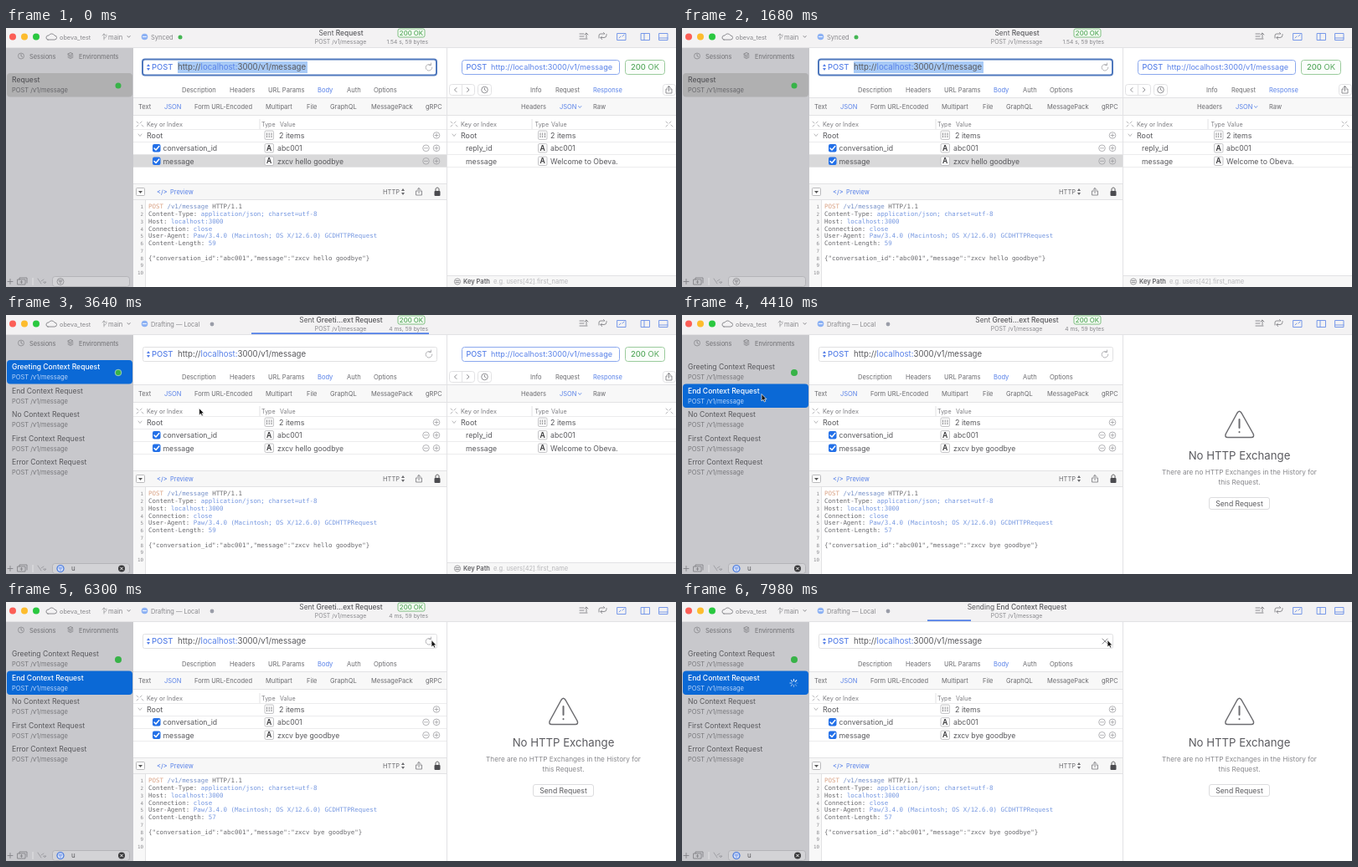
Write an HTML page that moves like this. It is 800 by 310 pixels and loops after 8000 ms.

```html
<!DOCTYPE html>
<html lang="en">
<head>
<meta charset="utf-8">
<title>API client</title>
<style>
  html, body { margin: 0; width: 100%; height: 100%; overflow: hidden; background: #fff; }
  svg { display: block; width: 800px; height: 310px; }
  text { font-family: Inter, Roboto, sans-serif; fill: #58585c; white-space: pre; }
  .code { font-family: "DejaVu Sans Mono", monospace; font-size: 7.45px; fill: #69696d; }
  .icon { fill: none; stroke: #838387; stroke-width: .9; stroke-linecap: round; stroke-linejoin: round; }
  .blue { stroke: #6a8fe8; }
  .rule { stroke: #e2e2e4; stroke-width: 1; }
  .faint { opacity: .65; }
</style>
</head>
<body>
<svg id="stage" viewBox="0 0 800 310"></svg>
<script>
const LOOP = 8000;
const DRAFT = 2100, ACTIVATE = 3000, SENT = 3200, PICK_END = 4200, SEND_END = 6700;
const BLUE = '#5881e8', DARK = '#58585c', GREY = '#88888c', GREEN = '#55a85c', SELECTED = '#0b69d6';

const text = (x, y, size, value, fill = DARK, extra = '') =>
  `<text x="${x}" y="${y}" font-size="${size}" style="fill:${fill}" ${extra}>${value}</text>`;
const middle = 'text-anchor="middle"';
const rect = (x, y, w, h, fill, r = 0, stroke = 'none', width = 1) =>
  `<rect x="${x}" y="${y}" width="${w}" height="${h}" rx="${r}" fill="${fill}" stroke="${stroke}" stroke-width="${width}"/>`;
const dot = (x, y, r, fill, extra = '') => `<circle cx="${x}" cy="${y}" r="${r}" fill="${fill}" ${extra}/>`;
const icon = (d, cls = '', extra = '') => `<path class="icon ${cls}" d="${d}" ${extra}/>`;
const ring = (x, y, r, color = '#a0a0a4') => dot(x, y, r, 'none', `stroke="${color}" stroke-width=".8"`);
const rule = (x1, y1, x2, y2, cls = '') => `<path class="rule ${cls}" d="M${x1} ${y1}L${x2} ${y2}"/>`;
const during = (from, to, ...parts) => `<g data-from="${from}" data-to="${to}">${parts.join('')}</g>`;
const tint = (fill, value) => `<tspan style="fill:${fill}">${value}</tspan>`;
const bold = value => `<tspan font-weight="550">${value}</tspan>`;
const labels = (y, size, items, active) =>
  items.map(([x, name]) => text(x, y, size, name, name === active ? BLUE : '#6a6a6e')).join('');
const addButton = (x, y) => ring(x, y, 3.8) + icon(`M${x - 2} ${y}h4M${x} ${y - 2}v4`, 'faint');
const removeButton = (x, y) => ring(x, y, 3.8) + icon(`M${x - 2} ${y}h4`, 'faint');
const share = (x, y) => icon(`M${x - 1.5} ${y - 1}h-2v5h7v-5h-2M${x} ${y + 1.5}v-6l-2 2m2-2l2 2`);
const upDown = (x, y, color) =>
  `<path d="M${x - 2} ${y - 1}l2-3 2 3zM${x - 2} ${y + 1}l2 3 2-3z" fill="${color}"/>`;
const expand = (x, y) => icon(`M${x - 3} ${y - 3}l2 2m4 2l2 2M${x + 3} ${y - 3}l-2 2m-2 2l-2 2`, 'faint');
const rowRules = (x1, x2) => [121.5, 136.5, 151.5, 166.5].map(y => rule(x1, y, x2, y, 'faint')).join('');

function toolbar() {
  const header = (title, stats) =>
    text(400, 9, 8.4, title, DARK, middle) + text(399.5, 18.5, 6.9, 'POST /v1/message', GREY, middle) +
    (stats ? rect(468, 1, 32, 10, '#f4fbf3', 2, '#80bf82') + text(484, 9, 7.8, '200 OK', GREEN, middle + ' font-weight="500"') +
      text(504, 18.5, 6.7, stats, GREY, 'text-anchor="end"') : '');
  const sending = name => header('Sending ' + bold(name));
  return rect(0, 0, 800, 23, '#f3f2f3') +
    [['#fc5f57', 8], ['#fdbc2e', 22], ['#2ac840', 36]].map(([c, x]) => dot(x, 10.5, 4, c)).join('') +
    icon('M50 14h8a2.5 2.5 0 0 0 0-5a4 4 0 0 0-7 0a2.5 2.5 0 0 0-1 5z') + text(64, 13.5, 7.3, 'obeva_test', GREY) +
    icon('M117 7v7M117 12c3 0 3-2 3-4M115 9l2-2 2 2', 'faint') +
    text(122, 13.5, 7.6, 'main', GREY) + icon('M145 9.5l1.6 1.8 1.6-1.8') +
    dot(165.5, 10.5, 3.8, '#8db2f4') + icon('M163.5 10.5h4', '', 'style="stroke:#fff"') +
    during(0, DRAFT, text(173, 13.5, 7.5, 'Synced', GREY), dot(208, 11, 2.5, '#44b653')) +
    during(DRAFT, LOOP, text(173, 13.5, 7.4, 'Drafting — Local', GREY), dot(246, 11, 2.4, '#9a9da8')) +
    during(0, ACTIVATE, header('Sent ' + bold('Request'), '1.54 s, 59 bytes')) +
    during(ACTIVATE, SENT, sending('Greeting Context Request')) +
    during(SENT, SEND_END, header('Sent ' + bold('Greeti...ext Request'), '4 ms, 59 bytes')) +
    during(SEND_END, LOOP, sending('End Context Request')) +
    icon('M685 7h5M685 10h5M685 13h9M693 12V6l-2 2m2-2l2 2') +
    icon('M708 12V9q0-2 2-2h5l-1.5-1.5M717 7.5v1q0 3-3 3h-4l1.5-1.5M710 11.5l1.5 2') +
    icon('M730 6.5h10v8h-10zM732 12l2-2m2 0l2-2', 'blue') +
    icon('M758.5 6.5h10v8h-10zM762 6.5v8', 'blue') + icon('M780 6.5h10v8h-10zM780 12h10', 'blue') +
    during(DRAFT, ACTIVATE, rect(0, 0, 800, 23, '#e4e4e4', 0).replace('/>', ' opacity=".5"/>'),
      [8, 22, 36].map(x => dot(x, 10.5, 4.2, '#d0d0d1')).join('')) +
    rule(0, 23.5, 800, 23.5) +
    `<rect id="progress" x="293" y="21.2" height="1.8" fill="#5683e8"/>`;
}

function sidebar() {
  const top = i => 54 + 28.5 * i;
  const row = (name, i, color = DARK, sub = '#77777b', weight = 400) =>
    text(7, top(i) + 11.3, 8.55, name, color, `font-weight="${weight}"`) + text(7, top(i) + 23, 7.5, 'POST /v1/message', sub);
  const pick = (i, fill) => rect(1, top(i), 150, 28.5, fill, 4);
  const names = ['Greeting', 'End', 'No', 'First', 'Error'].map(n => n + ' Context Request');
  const list = selected => names.map((n, i) => i === selected ? row(n, i, '#fff', '#bcd6fa', 500) : row(n, i)).join('');
  const status = r => dot(134, 69, r, '#38b348');
  const spokes = Array.from({ length: 8 }, (_, i) =>
    `<path d="M0-2V-5" stroke="#fff" stroke-width="1.1" opacity="${.25 + i * .1}" transform="rotate(${i * 45})"/>`).join('');
  const filterBars = 'M62.8 302h4.4M63.6 303.7h2.8M64.5 305.3h1';
  return rect(0, 24, 152, 286, '#c8c8cc') +
    during(DRAFT, ACTIVATE, rect(0, 24, 152, 286, '#dedede')) +
    ring(18, 33.5, 3.5, GREY) + icon('M18 31.5v2l1.5 1') + text(28, 36.5, 7.4, 'Sessions', '#707074') +
    icon('M74 31l3-1.5 3 1.5-3 1.5zM74 33l3 1.5 3-1.5M74 35l3 1.5 3-1.5') + text(87, 36.5, 7.4, 'Environments', '#707074') +
    during(0, DRAFT, pick(0, '#b0b0b1'), row('Request', 0, DARK, '#66666a', 500), status(3.5)) +
    during(DRAFT, ACTIVATE, pick(0, '#c0c0c0'), list(-1), status(3.3)) +
    during(ACTIVATE, PICK_END, pick(0, SELECTED), list(0), dot(134, 69, 3.8, '#38b348', 'stroke="#a9d3c4" stroke-width=".9"')) +
    during(PICK_END, LOOP, pick(1, SELECTED), list(1), status(4)) +
    during(SEND_END, LOOP, `<g transform="translate(133.5 97)"><g id="spinner">${spokes}</g></g>`) +
    icon('M2 303.5h6M5 300.5v6') + icon('M14 301h9v6h-9zM16 301v-2h9v6M18.5 302.5v3M17 304h3') +
    rule(32, 299, 32, 308) + icon('M38 300l4 6M42 303l3-2M45 304h3l-1.5 1.5z', 'faint') +
    rect(55.5, 297.5, 92, 12, 'rgba(255,255,255,.2)', 3, '#b4b4b8') +
    during(0, DRAFT, ring(65, 303.5, 4, GREY), icon(filterBars)) +
    during(DRAFT, LOOP, dot(65, 303.5, 4, '#d6e2f8', 'stroke="#3f73dc" stroke-width="1.2"'),
      icon(filterBars, 'blue'), text(78, 306.3, 8, 'u'),
      dot(138, 303.5, 4, '#39393b'), icon('M136.5 302l3 3m0-3l-3 3', '', 'style="stroke:#fff"'));
}

function typeBox(x, y, letter) {
  return rect(x, y, 10.5, 10.5, '#fafafa', 1.5, '#b8b8bc', .8) + (letter
    ? text(x + 5.25, y + 8.4, 8.6, 'A', '#38383b', middle + ' font-weight="600"')
    : icon(`M${x + 2.5} ${y + 3}v5M${x + 5.2} ${y + 3}v5M${x + 8} ${y + 3}v5`, '', 'stroke-dasharray="1.7 1.3"'));
}

function tree(left, typeX, valueX) {
  return expand(left, 115) + text(left + 9, 118, 7.3, 'Key or Index', '#7c7c80') +
    text(typeX - 4, 118, 7.1, 'Type', '#7c7c80') + text(valueX + 1, 118, 7.1, 'Value', '#7c7c80') +
    icon(`M${left - 1} 127l2 2.5 2-2.5`, 'faint') + text(left + 9, 132, 8.9, 'Root') +
    typeBox(typeX, 123) + text(valueX, 132, 8.9, '2 items') + typeBox(typeX, 138.5, true) + typeBox(typeX, 154, true);
}

const url = (x, y, size, color = DARK) =>
  text(x, y, size, `http://${tint(BLUE, 'localhost')}${color === BLUE ? ':3000' : tint(BLUE, ':') + '3000'}/v1/message`, color);

function bodyPanel() {
  const check = (y, color, width) => icon(`M177 ${y + 5}l2 2 3.8-4.5`, '', `style="stroke:${color};stroke-width:${width}"`);
  const rows = [139, 154.5];
  const checkboxes = rows.map(y => rect(175, y, 9.5, 9.5, '#2370e8', 2) + check(y, '#fff', 1.5)).join('');
  const idle = rows.map(y => check(y, '#444', 1.2)).join('');
  const message = value => text(324, 163, 8.65, value);
  return rect(152, 24, 374, 286, '#fff') +
    during(0, DRAFT, rect(163, 37.5, 351, 19, '#fff', 3, '#4f78bd', 2), rect(205, 40, 155, 14, '#a8caf6')) +
    during(DRAFT, LOOP, rect(163.5, 38.5, 351, 17, '#fff', 2, '#e0e0e2')) +
    upDown(170, 47, BLUE) + text(174, 50.4, 9.4, 'POST', BLUE, 'font-weight="500"') + url(205, 50.4, 9.65) +
    during(0, SEND_END, icon('M507 44a3.8 3.8 0 1 0 1.8 3M507.5 42v2.5h-2.5', 'faint')) +
    during(SEND_END, LOOP, icon('M502 44l6 6m0-6l-6 6')) +
    labels(77, 7.55, [[210, 'Description'], [267, 'Headers'], [313, 'URL Params'], [372, 'Body'], [407, 'Auth'], [439, 'Options']], 'Body') +
    rect(152, 83, 374, 21, '#f8f8f8') + rule(152, 83.5, 526, 83.5) + rule(152, 104.5, 526, 104.5) +
    labels(97, 7.5, [[158, 'Text'], [189, 'JSON'], [225, 'Form URL-Encoded'], [310, 'Multipart'], [359, 'File'],
      [387, 'GraphQL'], [436, 'MessagePack'], [501, 'gRPC']], 'JSON') +
    during(0, DRAFT, rect(152, 151.5, 374, 15, '#d9d9da')) +
    rowRules(152, 526) + rule(303, 109, 303, 121) +
    tree(159, 309, 326) + addButton(514, 128.5) +
    during(0, DRAFT, checkboxes) + during(DRAFT, ACTIVATE, idle) + during(ACTIVATE, LOOP, checkboxes) +
    text(187.5, 147, 8.7, 'conversation_id') + text(187.5, 163, 8.7, 'message') + text(324, 147, 8.7, 'abc001') +
    during(0, PICK_END, message('zxcv hello goodbye')) + during(PICK_END, LOOP, message('zxcv bye goodbye')) +
    [143.8, 159.3].map(y => removeButton(501.5, y) + addButton(514, y)).join('');
}

function preview() {
  const line = i => 216.4 + 8.75 * i;
  const code = (i, value) => `<text class="code" x="170" y="${line(i)}">${value}</text>`;
  const headers = [['Content-Type', 'application/json; charset=utf-8'], ['Host', 'localhost:3000'], ['Connection', 'close'],
    ['User-Agent', 'Paw/3.4.0 (Macintosh; OS X/12.6.0) GCDHTTPRequest']];
  const value = v => tint('#7597e0', v);
  const payload = (words, length) => code(5, `Content-Length: ${value(length)}`) +
    code(7, `{"conversation_id":"abc001","message":"zxcv ${words}"}`);
  const numbers = Array.from({ length: 10 }, (_, i) =>
    `<text class="code" x="164" y="${line(i)}" text-anchor="end" style="font-size:5.8px;fill:#8a8a8e">${i + 1}</text>`).join('');
  return rect(152, 186, 374, 19, '#f7f7f7') + rule(152, 186.5, 526, 186.5) + rule(152, 205.5, 526, 205.5) +
    rect(155.5, 191.5, 10, 9, '#fff', 1, '#aaaaad', .8) + `<path d="M158 195h5l-2.5 3z" fill="#555"/>` +
    text(180, 199, 7.4, '&lt;/&gt;', BLUE, 'font-weight="500"') + text(196, 199, 7.4, 'Preview', BLUE) +
    text(450, 199, 7.5, 'HTTP', '#6a6a6e') + upDown(474, 196, '#6a6a6e') + share(493, 196) +
    rect(511.5, 195, 7, 6, '#4c4c50', 1) + icon('M513 195v-2c0-2.5 4-2.5 4 0v2', '', 'style="stroke:#4c4c50"') +
    rect(152, 206, 14, 104, '#f8f8f8') + rule(166.5, 206, 166.5, 310) + numbers +
    code(0, `${tint('#d9a183', 'POST')} ${tint('#7590c8', '/v1/message')} HTTP/1.1`) +
    headers.map(([name, v], i) => code(i + 1, `${name}: ${value(v)}`)).join('') +
    during(0, PICK_END, payload('hello goodbye', 59)) + during(PICK_END, LOOP, payload('bye goodbye', 57));
}

function response() {
  const exchange = rect(544.5, 38.5, 188, 17, '#fff', 3, '#8aa8ee') +
    text(549.5, 50.4, 9.1, 'POST', BLUE, 'font-weight="500"') + url(579, 50.4, 9.15, BLUE) +
    rect(739.5, 38.5, 47, 17, '#fbfefb', 3, '#9acb9c') + text(763, 50.4, 9.4, `${bold('200')} OK`, GREEN, middle) +
    rect(529.5, 67.5, 30, 13, '#fff', 3, '#e2e2e4') + rule(544.5, 68, 544.5, 80) +
    icon('M538 71.5l-2.5 2.5 2.5 2.5M550.5 71.5l2.5 2.5-2.5 2.5') + rect(563.5, 67.5, 16, 13, '#fff', 3, '#e2e2e4') +
    ring(571.5, 74, 3.8, '#77777b') + icon('M571.5 72v2l1.5 1') + rect(784.5, 67.5, 15, 13, '#fff', 3, '#e2e2e4') + share(791.5, 74) +
    labels(76.5, 7.5, [[626, 'Info'], [656, 'Request'], [701, 'Response']], 'Response') +
    rect(527, 83, 273, 21, '#f8f8f8') + rule(527, 83.5, 800, 83.5) + rule(527, 104.5, 800, 104.5) +
    labels(97, 7.5, [[615, 'Headers'], [661, 'JSON'], [701, 'Raw']], 'JSON') + icon('M683.5 93.5l1.7 2 1.7-2', 'blue') +
    rowRules(527, 800) + rule(628, 109, 628, 121) +
    tree(534, 635.5, 650) + expand(791, 115) +
    text(549, 147, 8.7, 'reply_id') + text(549, 163, 8.7, 'message') +
    text(650, 147, 8.7, 'abc001') + text(650, 163, 8.75, 'Welcome to Obeva.') +
    rect(527, 296, 273, 14, '#f7f7f7') + rule(527, 296.5, 800, 296.5) +
    ring(539, 303.5, 3.6, GREY) + icon('M537 302.5h4M537 304.5h4') +
    text(546, 306, 7.5, 'Key Path', '#626266', 'font-weight="600"') + text(582, 306, 7.5, 'e.g. users[42].first_name', '#b8b8bb');
  const empty = icon('M662.8 117.5q2.7-4.5 5.4 0l14 25q1.5 4-2.5 4h-28q-4 0-2.5-4z', '', 'style="stroke:#6c6c70;stroke-width:1.5"') +
    icon('M665.5 125v10M665.5 140v.2', '', 'style="stroke:#6c6c70;stroke-width:2"') +
    text(665.5, 173, 13.2, 'No HTTP Exchange', '#5a5a5f', middle) +
    text(665.5, 191, 8.2, 'There are no HTTP Exchanges in the History for', GREY, middle) + text(665.5, 203, 8.2, 'this Request.', GREY, middle) +
    rect(629.5, 218.5, 72, 14, '#fff', 2.5, '#dcdcde') + text(665.5, 228.6, 8.6, 'Send Request', DARK, middle);
  return rect(526, 24, 274, 286, '#fff') + during(0, PICK_END, exchange) + during(PICK_END, LOOP, empty) + rule(526.5, 24, 526.5, 310);
}

const pointer = during(DRAFT, LOOP, `<path id="pointer" d="M0-3.5V5l2-1.8L3.3 6l1.5-.7L3.5 2.7H6z" fill="#151515" stroke="#fff" stroke-width=".7"/>`);
const stage = document.getElementById('stage');
stage.innerHTML = sidebar() + bodyPanel() + preview() + response() + toolbar() + pointer;

const spans = [...stage.querySelectorAll('[data-from]')];
const [progress, spinner, cursor] = ['progress', 'spinner', 'pointer'].map(id => document.getElementById(id));
const path = [[DRAFT, 508, 48], [3350, 508, 48], [3640, 231, 115], [3950, 95, 98], [4550, 95, 98], [5110, 444, 89], [5450, 508, 49], [LOOP, 508, 49]];
const clamp = v => Math.max(0, Math.min(1, v));

function pointerAt(t) {
  const i = Math.max(1, path.findIndex(p => p[0] > t));
  const [a, b] = [path[i - 1], path[i]];
  const k = clamp((t - a[0]) / (b[0] - a[0]));
  return [a[1] + (b[1] - a[1]) * k, a[2] + (b[2] - a[2]) * k];
}

function render(t) {
  for (const el of spans) {
    el.style.display = t >= +el.dataset.from && t < +el.dataset.to ? '' : 'none';
  }
  const sending = t >= SEND_END;
  progress.setAttribute('width', sending ? 52 * clamp((t - SEND_END) / 500) : 212 * clamp((t - ACTIVATE) / (SENT - ACTIVATE)));
  progress.setAttribute('opacity', sending ? 1 : clamp((4000 - t) / 300));
  spinner.setAttribute('transform', `rotate(${Math.floor(t / 70) * 45 % 360})`);
  cursor.setAttribute('transform', `translate(${pointerAt(t)})`);
}

const start = performance.now();
function tick() {
  render((performance.now() - start) % LOOP);
  requestAnimationFrame(tick);
}
tick();
</script>
</body>
</html>
```
